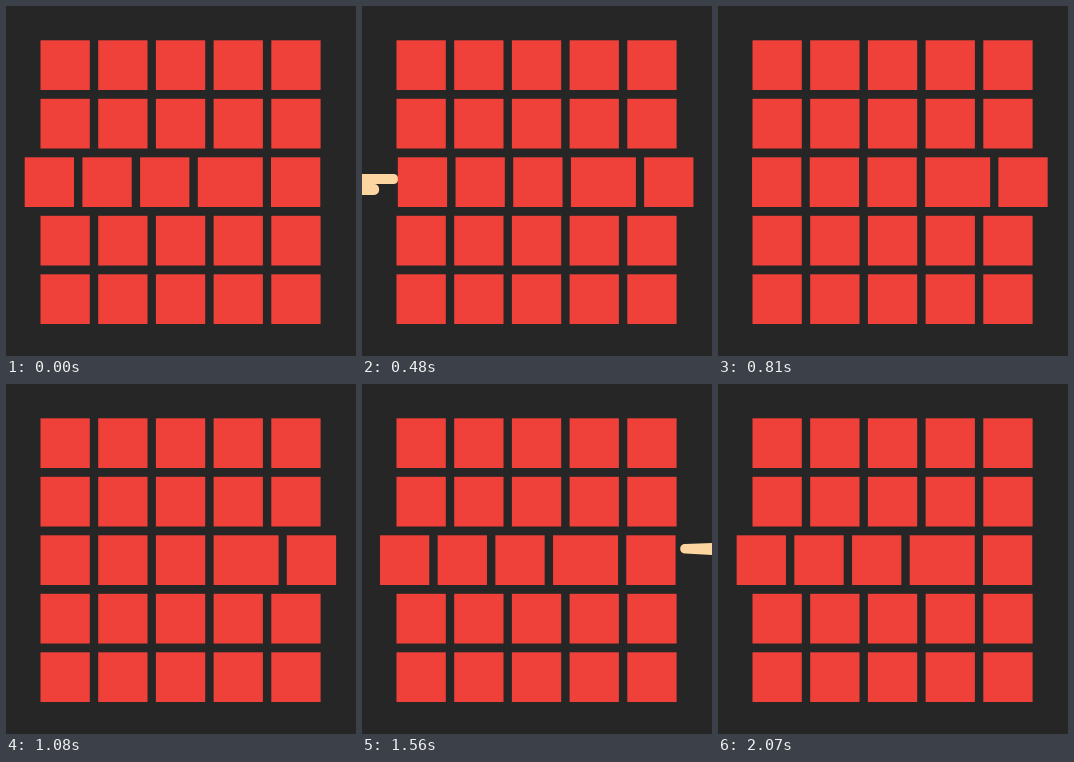
Write an HTML page with a canvas that moves like this. It is 350 px wide and 350 px high and loops after 2.1 s.

```html
<!DOCTYPE html>
<html>
<head>
<meta charset="utf-8">
<title>Pushed row</title>
<style>
html, body { margin: 0; height: 100%; overflow: hidden; background: #262626; }
canvas { display: block; width: 100vw; height: 100vh; }
</style>
</head>
<body>
<canvas id="c" width="350" height="350"></canvas>
<script>
const ctx = document.getElementById('c').getContext('2d');
const LOOP = 2100, RED = '#ef4139', SKIN = '#fcd5a0';
const LEFT = 18.7, RIGHT = 34.5, ROW_WIDTH = 295.8;

// Smooth move from a to b between times t0 and t1
function ease(t, t0, t1, a, b) {
  const u = Math.min(1, Math.max(0, (t - t0) / (t1 - t0)));
  return a + (b - a) * u * u * (3 - 2 * u);
}

const leftTip = t => t < 500 ? ease(t, 100, 500, -2, 36.4) : ease(t, 500, 775, 36.4, -24);
const rightTip = t => t < 1460 ? ease(t, 1060, 1460, 352, 313.3) : ease(t, 1460, 2035, 313.3, 375);

// Left edge of the middle row: pushed by a finger, then settling
function rowX(t) {
  if (t < 500) return Math.max(LEFT, leftTip(t) - 0.3);
  if (t < 1060) {
    const s = t - 500;
    return RIGHT + 1.6 * Math.exp(-s * 0.004) * Math.cos(s * Math.PI / 100);
  }
  if (t < 1460) return Math.min(RIGHT, rightTip(t) - ROW_WIDTH);
  return LEFT - 1.2 * Math.exp(-(t - 1460) * 0.005);
}

function drawLeftHand(x) {
  ctx.beginPath();
  ctx.roundRect(x - 80, 168, 80, 10, 4.5);
  ctx.roundRect(x - 80, 178, 61, 11, 5);
  ctx.fill();
}

function drawRightHand(x) {
  ctx.save();
  ctx.translate(x, 0);
  ctx.fill(new Path2D('M0 165C0 161.5 2 160 5 160L32 159L60 158V172L32 171L5 169.5C2 169.3 0 168 0 165Z'));
  ctx.restore();
}

function draw(t) {
  ctx.fillStyle = '#262626';
  ctx.fillRect(0, 0, 350, 350);
  ctx.fillStyle = SKIN;
  if (t > 100 && t < 775) drawLeftHand(leftTip(t));
  if (t > 1060 && t < 2035) drawRightHand(rightTip(t));
  ctx.fillStyle = RED;
  for (let r = 0; r < 5; r++) {
    const middle = r === 2;
    const x = middle ? rowX(t) : 34.5;
    for (let i = 0; i < 5; i++) {
      const wide = middle && i === 3;
      const shift = middle && i === 4 ? 15.5 : 0;
      ctx.fillRect(x + i * 57.7 + shift, 34.3 + r * 58.5, wide ? 65 : 49.3, 49.7);
    }
  }
}

function tick() {
  draw(Math.floor(performance.now() % LOOP / 30) * 30);
  requestAnimationFrame(tick);
}
tick();
</script>
</body>
</html>
```
